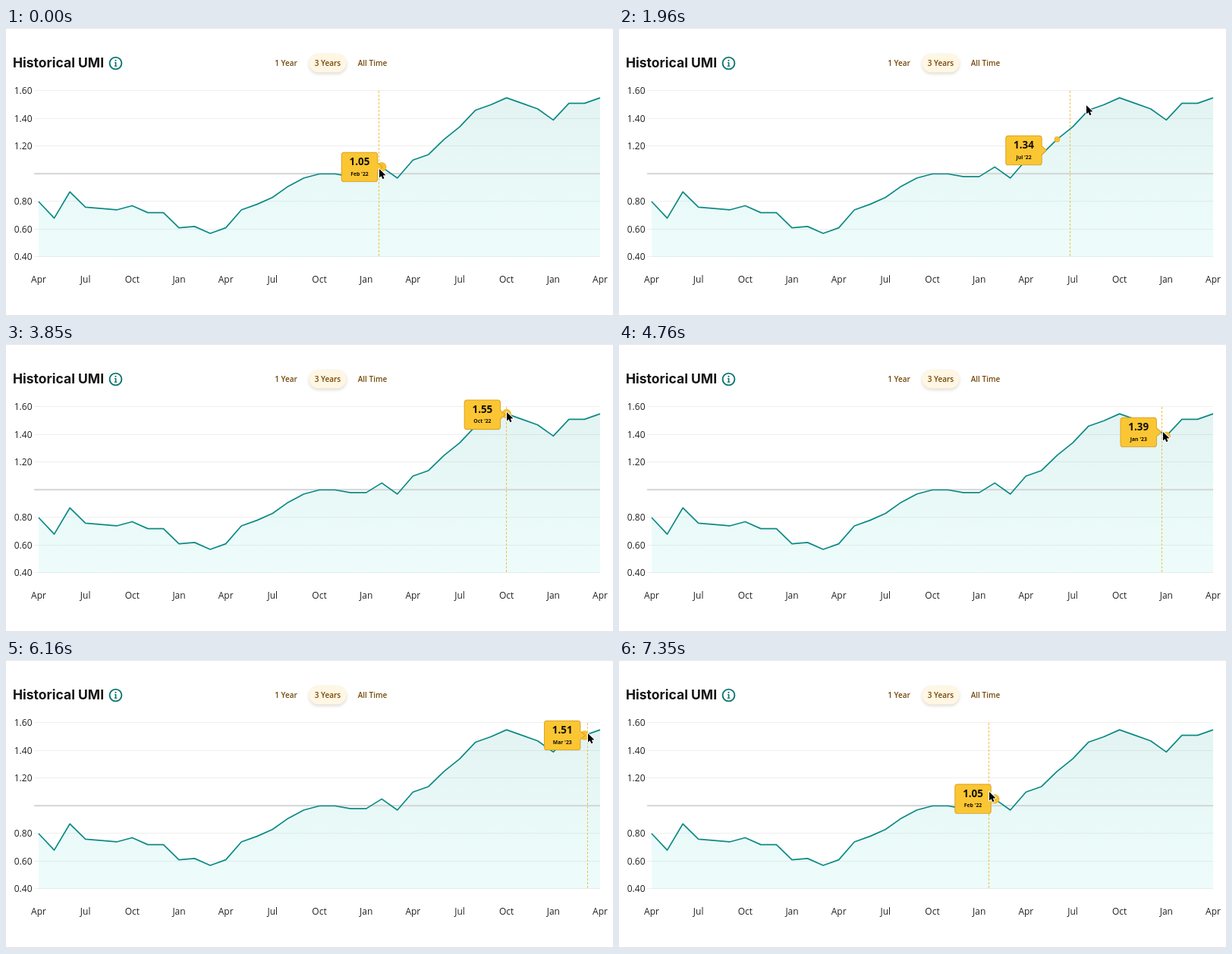
These frames come from a looping animation (800 by 380 pixels, 7.42 s). An HTML page with a canvas:

```html
<!DOCTYPE html>
<html lang="en">
<head>
<meta charset="utf-8">
<title>Historical UMI</title>
<style>
  html, body { margin: 0; width: 100%; height: 100%; overflow: hidden; background: #fff; }
  canvas { display: block; width: 800px; height: 380px; }
</style>
</head>
<body>
<canvas id="stage"></canvas>
<script>
const LOOP = 7420, TICK = 70, STEP = 5;
const LINE_LAG = 30, DOT_LAG = 45, TIP_TAU = 79;
const LEFT = 43, RIGHT = 783, TOP = 83, BOTTOM = 302;
const SANS = '"Open Sans", "Noto Sans", sans-serif';
const MONTHS = 'Jan Feb Mar Apr May Jun Jul Aug Sep Oct Nov Dec'.split(' ');

// Monthly index in hundredths, from April 2020
const values = [
  80, 68, 87, 76, 75, 74, 77, 72, 72, 61, 62, 57, 61, 74, 78, 83, 91, 97, 100,
  100, 98, 98, 105, 97, 110, 114, 125, 134, 146, 150, 155, 151, 147, 139, 151, 151, 155
];
const GAP = (RIGHT - LEFT) / (values.length - 1);
const yOf = v => BOTTOM - (v - 40) * (BOTTOM - TOP) / 120;
const points = values.map((v, i) => ({ x: LEFT + i * GAP, y: yOf(v) }));

// The pointer rests, then glides to each next stop.
const home = { x: 492, y: 186 };
const moves = [
  { at: 370, time: 680, x: 564, y: 157 },
  { at: 1905, time: 44, x: 616, y: 102 },
  { at: 2000, time: 200, x: 619, y: 99 },
  { at: 3250, time: 600, x: 660, y: 90 },
  { at: 4130, time: 640, x: 717, y: 116 },
  { at: 5010, time: 340, x: 767, y: 97 },
  { at: 6760, time: 135, x: 488, y: 174 }
];

const canvas = document.getElementById('stage');
const ctx = canvas.getContext('2d');
const dpr = window.devicePixelRatio || 1;
canvas.width = 800 * dpr;
canvas.height = 380 * dpr;
ctx.scale(dpr, dpr);

const clamp = (v, lo, hi) => Math.max(lo, Math.min(hi, v));
const smooth = u => u * u * (3 - 2 * u);

function pointerAt(t) {
  let { x, y } = home;
  for (const m of moves) {
    const u = smooth(clamp((t - m.at) / m.time, 0, 1));
    x += (m.x - x) * u;
    y += (m.y - y) * u;
  }
  return { x, y };
}

const nearest = x => clamp(Math.round((x - LEFT) / GAP), 0, values.length - 1);

// The tooltip eases towards the hovered point; the marker grows after each change.
function buildStates() {
  const list = [];
  const ease = 1 - Math.exp(-STEP / TIP_TAU);
  let dot = nearest(home.x), since = -1000;
  const tip = { ...points[dot] };
  for (let t = 0; t <= LOOP; t += STEP) {
    const lineX = pointerAt(t - LINE_LAG).x;
    const index = nearest(lineX);
    const next = nearest(pointerAt(t - DOT_LAG).x);
    if (next !== dot) { dot = next; since = t; }
    tip.x += (points[index].x - tip.x) * ease;
    tip.y += (points[index].y - tip.y) * ease;
    const radius = 3.5 + 2.3 * Math.min(1, (t - since) / 100);
    list.push({ lineX, index, dot, radius, tipX: tip.x, tipY: tip.y });
  }
  return list;
}
const states = buildStates();

function text(str, x, y, font, color, align = 'center') {
  ctx.font = font;
  ctx.fillStyle = color;
  ctx.textAlign = align;
  ctx.fillText(str, x, y);
}

function line(x1, y1, x2, y2, color, width = 1) {
  ctx.beginPath();
  ctx.moveTo(x1, y1);
  ctx.lineTo(x2, y2);
  ctx.strokeStyle = color;
  ctx.lineWidth = width;
  ctx.stroke();
}

function circle(x, y, r) {
  ctx.beginPath();
  ctx.arc(x, y, r, 0, Math.PI * 2);
}

function shadow(color, blur, dy) {
  ctx.shadowColor = color;
  ctx.shadowBlur = blur * dpr;
  ctx.shadowOffsetY = dy * dpr;
}

function drawInfo(x, y) {
  const teal = '#0b756f';
  circle(x, y, 7.9);
  ctx.strokeStyle = teal;
  ctx.lineWidth = 1.9;
  ctx.stroke();
  circle(x, y - 3.7, 1.1);
  ctx.fillStyle = teal;
  ctx.fill();
  line(x - 1.5, y - 0.8, x + 0.7, y - 0.8, teal, 1.2);
  line(x + 0.1, y - 1.3, x + 0.1, y + 3.9, teal, 1.6);
  line(x - 1.7, y + 3.7, x + 1.9, y + 3.7, teal, 1.2);
}

function drawHeader() {
  text('Historical UMI', 9, 52, '700 17.5px Inter, sans-serif', '#161616', 'left');
  drawInfo(144.5, 46.5);

  ctx.save();
  shadow('rgba(90, 70, 30, 0.2)', 4, 2);
  ctx.fillStyle = '#fff6e3';
  ctx.beginPath();
  ctx.roundRect(399.5, 34, 49, 24.5, 12.25);
  ctx.fill();
  ctx.restore();

  const font = '600 10px ' + SANS, brown = '#75480a';
  text('1 Year', 369, 50, font, brown);
  text('3 Years', 424, 50, font, brown);
  text('All Time', 483, 50, font, brown);
}

function traceSeries() {
  ctx.beginPath();
  for (const p of points) ctx.lineTo(p.x, p.y);
}

function drawChart(lineX) {
  const font = '12px ' + SANS, ink = '#222';
  for (let v = 40; v <= 160; v += 20) {
    if (v === 100) continue;
    const y = Math.round(yOf(v)) - 0.5;
    line(37, y, RIGHT, y, '#efefef');
    text((v / 100).toFixed(2), 34.5, yOf(v) + 4.3, font, ink, 'right');
  }
  for (let i = 0; i < values.length; i += 3) {
    text(MONTHS[(i + 3) % 12], points[i].x, 336.4, font, ink);
  }

  const fill = ctx.createLinearGradient(0, yOf(155), 0, BOTTOM);
  fill.addColorStop(0, 'rgba(10, 150, 143, 0.115)');
  fill.addColorStop(1, 'rgba(20, 220, 202, 0.075)');
  traceSeries();
  ctx.lineTo(RIGHT, BOTTOM);
  ctx.lineTo(LEFT, BOTTOM);
  ctx.fillStyle = fill;
  ctx.fill();

  line(37, 192.3, RIGHT, 192.3, '#d2d5d6', 1.9);

  const x = Math.round(lineX) - 0.5;
  ctx.setLineDash([3, 2]);
  line(x, TOP, x, BOTTOM, '#f0c04c');
  ctx.setLineDash([]);

  traceSeries();
  ctx.strokeStyle = '#0d8a84';
  ctx.lineWidth = 1.7;
  ctx.lineJoin = 'round';
  ctx.stroke();
}

function drawDot(p, r) {
  circle(p.x, p.y, r);
  ctx.fillStyle = '#f9c12f';
  ctx.fill();
  ctx.strokeStyle = '#e9ad22';
  ctx.lineWidth = 0.8;
  ctx.stroke();
}

function drawTooltip({ tipX, tipY, index }) {
  const w = 46.5, h = 37.5;
  const right = tipX - 6, left = right - w;
  ctx.save();
  shadow('rgba(0, 0, 0, 0.1)', 1, 0.5);
  ctx.beginPath();
  ctx.roundRect(left, tipY - h / 2, w, h, 3);
  ctx.moveTo(right, tipY - 5.5);
  ctx.lineTo(tipX, tipY);
  ctx.lineTo(right, tipY + 5.5);
  ctx.strokeStyle = '#dda11c';
  ctx.lineWidth = 1.8;
  ctx.stroke();
  ctx.restore();
  ctx.fillStyle = '#fbc633';
  ctx.fill();

  const cx = left + w / 2, month = index + 3, ink = '#141008';
  const date = MONTHS[month % 12] + " '" + (20 + Math.floor(month / 12));
  text((values[index] / 100).toFixed(2), cx, tipY - 2, '700 13.4px ' + SANS, ink);
  text(date, cx, tipY + 11.2, '700 6.8px ' + SANS, ink);
}

const arrow = new Path2D('M0 0V11.6L2.6 9.2L4.4 13.2L6.5 12.3L4.8 8.4L8.4 8.3Z');

function drawPointer({ x, y }) {
  ctx.save();
  ctx.translate(x, y);
  ctx.lineJoin = 'round';
  ctx.strokeStyle = '#fff';
  ctx.lineWidth = 2;
  ctx.stroke(arrow);
  ctx.fillStyle = '#000';
  ctx.fill(arrow);
  ctx.restore();
}

function draw(t) {
  const s = states[t / STEP];
  ctx.fillStyle = '#fff';
  ctx.fillRect(0, 0, 800, 380);
  line(0, 0.5, 800, 0.5, '#e6e6e6');
  line(0, 379.5, 800, 379.5, '#e0e0e0');
  drawHeader();
  drawChart(s.lineX);
  drawDot(points[s.dot], s.radius);
  drawTooltip(s);
  drawPointer(pointerAt(t));
}

const start = performance.now();
function frame() {
  const t = (performance.now() - start) % LOOP;
  draw(Math.floor(t / TICK) * TICK);
  requestAnimationFrame(frame);
}
frame();
</script>
</body>
</html>
```
